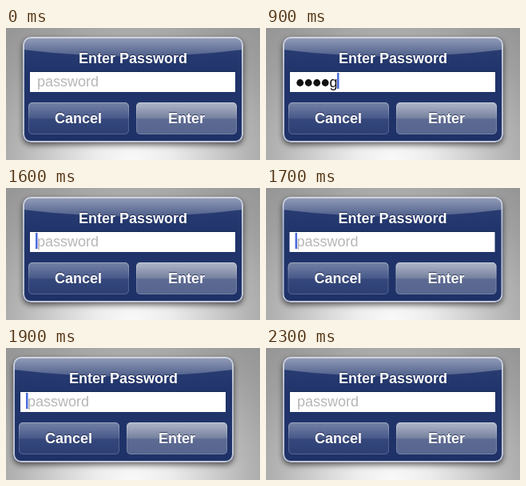
An HTML page with a canvas that plays this animation: 318x165 px, repeating every 2400 ms.

```html
<!DOCTYPE html>
<html lang="en">
<head>
<meta charset="utf-8">
<title>Enter Password</title>
<style>
html, body { margin: 0; width: 100%; height: 100%; overflow: hidden; background: #b4b4b4; }
canvas { display: block; width: 100vw; height: 100vh; }
</style>
</head>
<body>
<canvas id="stage"></canvas>
<script>
const W = 318, H = 165, LOOP = 2400, TICK = 100;
const FONT = '"Liberation Sans", Arial, sans-serif';
const PANEL = [21, 11, 276, 132];
const canvas = document.getElementById('stage');
const ctx = canvas.getContext('2d');
const ratio = window.devicePixelRatio || 1;
canvas.width = W * ratio;
canvas.height = H * ratio;
ctx.scale(ratio, ratio);

// Each state holds from `at` until the next one.
const states = [
  { at: 0 },
  { at: 100, caret: 0.5 },
  { at: 200, caret: 1 },
  { at: 300, text: 'w', caret: 1 },
  { at: 500, text: 'wr', caret: 1 },
  { at: 700, text: 'wro', caret: 1 },
  { at: 800, text: 'wron', caret: 1 },
  { at: 900, text: 'wrong', caret: 1 },
  { at: 1400, text: 'wrong', caret: 0.75 },
  { at: 1500, text: 'wrong', caret: 0.35 },
  { at: 1600, caret: 1 },
  { at: 1700, caret: 1, shift: -0.5 },
  { at: 1800, caret: 1, shift: 8 },
  { at: 1900, caret: 1, shift: -12 },
  { at: 2000, caret: 0.8, shift: -4 },
  { at: 2100, caret: 0.6, shift: 1 },
  { at: 2200, caret: 0.3 },
  { at: 2300 }
];

function addStops(gradient, stops) {
  stops.forEach(([p, c]) => gradient.addColorStop(p, c));
  return gradient;
}

function fade(y0, y1, ...stops) {
  return addStops(ctx.createLinearGradient(0, y0, 0, y1), stops);
}

function box(x, y, w, h, r) {
  ctx.beginPath();
  ctx.roundRect(x, y, w, h, r);
}

function label(text, x, y) {
  ctx.font = 'bold 18px ' + FONT;
  ctx.fillStyle = 'rgba(8,16,50,0.65)';
  ctx.fillText(text, x, y - 1);
  ctx.fillStyle = '#fff';
  ctx.fillText(text, x, y);
}

// Light rising from below the panel
function drawBackdrop() {
  ctx.fillStyle = addStops(ctx.createRadialGradient(159, 168, 0, 159, 168, 235), [
    [0, '#fafafa'], [0.2, '#ececec'], [0.4, '#d2d2d2'],
    [0.6, '#b6b6b6'], [0.8, '#a0a0a0'], [1, '#949494']
  ]);
  ctx.fillRect(0, 0, W, H);
}

function drawPanel() {
  const [x, y, w, h] = PANEL;
  ctx.save();
  ctx.shadowColor = 'rgba(0,0,0,0.6)';
  ctx.shadowBlur = 7 * ratio;
  ctx.shadowOffsetY = 3 * ratio;
  box(x, y, w, h, 10);
  ctx.fillStyle = '#20336a';
  ctx.fill();
  ctx.restore();

  ctx.save();
  box(x, y, w, h, 10);
  ctx.clip();
  ctx.fillStyle = fade(y, y + h, [0, '#2c3f75'], [0.35, '#20346b'], [1, '#1f3268']);
  ctx.fillRect(x, y, w, h);
  // curved gloss along the top
  ctx.beginPath();
  ctx.moveTo(x, y);
  ctx.lineTo(x + w, y);
  ctx.lineTo(x + w, 27);
  ctx.quadraticCurveTo(x + w / 2, 44, x, 27);
  ctx.closePath();
  ctx.fillStyle = fade(y, 36, [0, 'rgba(255,255,255,0.5)'], [1, 'rgba(255,255,255,0.18)']);
  ctx.fill();
  ctx.restore();

  box(x + 1, y + 1, w - 2, h - 2, 9);
  ctx.lineWidth = 2;
  ctx.strokeStyle = fade(y, y + h, [0, '#cfd3dd'], [0.3, '#b4bbcc'], [1, '#bfc5d3']);
  ctx.stroke();
}

function drawButton(text, x, w, textX, tones) {
  box(x, 93, w, 40, 5);
  ctx.fillStyle = fade(93, 133, [0, tones[0]], [0.49, tones[1]], [0.52, tones[2]], [1, tones[3]]);
  ctx.fill();
  box(x + 0.5, 93.5, w - 1, 39, 4.5);
  ctx.lineWidth = 1;
  ctx.strokeStyle = fade(93, 133, [0, 'rgba(255,255,255,0.3)'], [0.5, 'rgba(255,255,255,0.15)'], [1, 'rgba(255,255,255,0.2)']);
  ctx.stroke();
  label(text, textX, 119);
}

function drawField({ text = '', caret = 0 }) {
  ctx.fillStyle = 'rgba(15,25,60,0.6)';
  ctx.fillRect(30, 54, 257, 1);
  ctx.fillStyle = '#fff';
  ctx.fillRect(30, 55, 257, 25);

  ctx.font = '18px ' + FONT;
  let x = 37.5;
  if (!text) {
    ctx.fillStyle = '#b6b6b6';
    ctx.fillText('password', 39, 73);
  } else {
    ctx.fillStyle = '#111';
    const last = text.slice(-1);
    for (let i = 1; i < text.length; i++, x += 10.5) {
      ctx.beginPath();
      ctx.arc(x + 5.2, 68.5, 4.4, 0, Math.PI * 2);
      ctx.fill();
    }
    ctx.fillText(last, x, 74);
    x += ctx.measureText(last).width;
  }
  ctx.globalAlpha = caret;
  ctx.fillStyle = '#4a6be0';
  ctx.fillRect(text ? x - 0.5 : 37, 56, 2.5, 20);
  ctx.globalAlpha = 1;
}

function draw(time) {
  const t = Math.floor((time % LOOP) / TICK) * TICK;
  const state = states.findLast(s => s.at <= t);
  drawBackdrop();
  ctx.save();
  ctx.translate(state.shift || 0, 0);
  drawPanel();
  label('Enter Password', 91, 43.5);
  drawField(state);
  drawButton('Cancel', 28, 126, 61, ['#7582a5', '#48598a', '#35477b', '#2c3f75']);
  drawButton('Enter', 163, 126, 203, ['#b0b7c9', '#75819f', '#5d6b93', '#56658f']);
  ctx.restore();
}

const start = performance.now();
function loop() {
  draw(performance.now() - start);
  requestAnimationFrame(loop);
}
loop();
</script>
</body>
</html>
```
